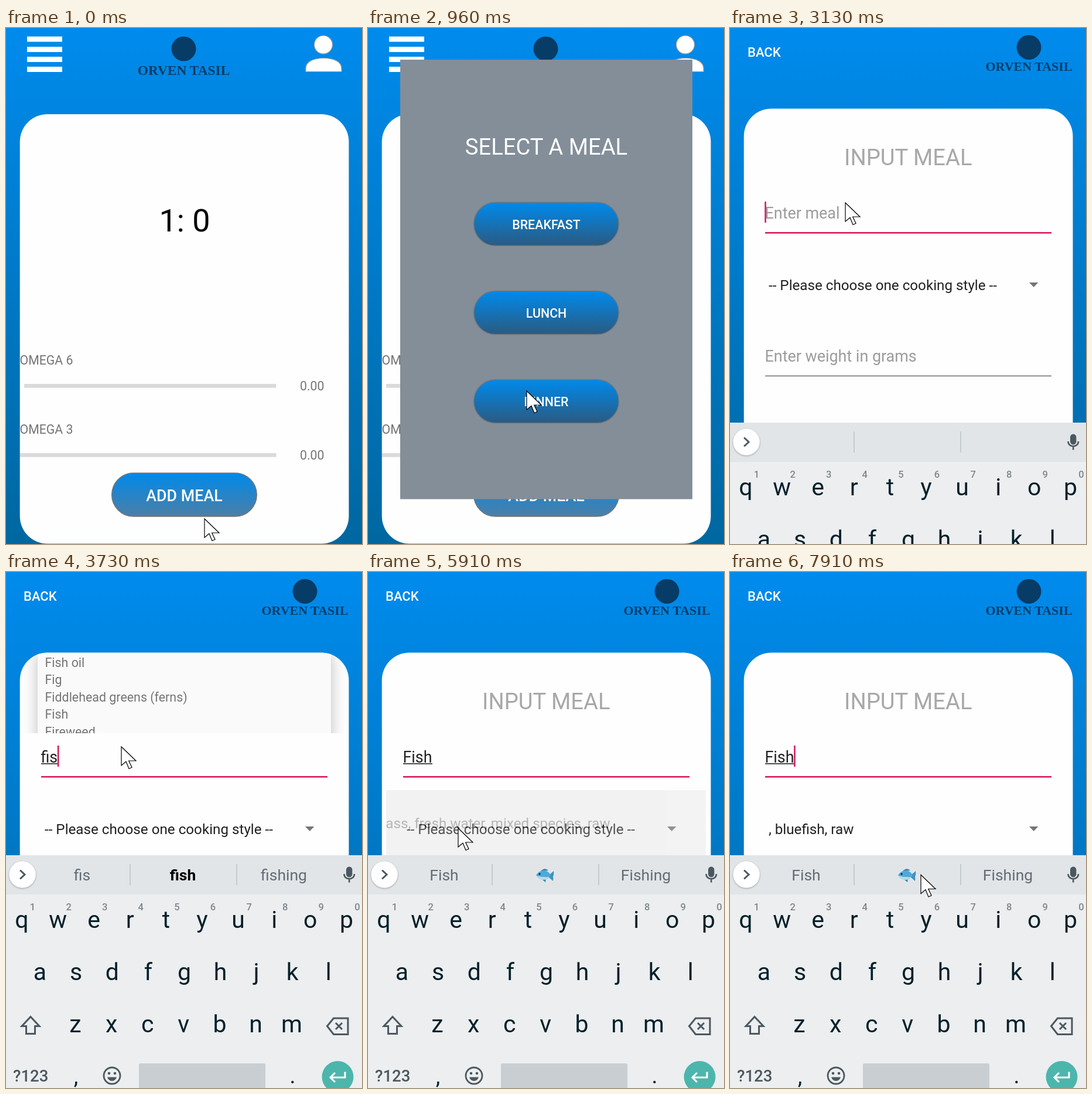
Write an HTML page that moves like this. It is 608 px wide and 880 px high and loops after 8000 ms.

```html
<!DOCTYPE html>
<html lang="en">
<head>
<meta charset="utf-8">
<title>Meal input</title>
<style>
html, body { margin: 0; width: 100%; height: 100%; overflow: hidden; }
svg { display: block; width: 608px; height: 880px; font-family: Roboto, "Noto Sans", sans-serif; }
text { white-space: pre; }
.mid { text-anchor: middle; }
.med { font-weight: 500; }
.brand { font-family: "Liberation Serif", "Noto Serif", serif; font-weight: 700; text-anchor: middle; }
</style>
</head>
<body>
<svg id="stage" viewBox="0 0 608 880" xmlns="http://www.w3.org/2000/svg"></svg>
<script>
const LOOP = 8000;
const stage = document.getElementById('stage');

// ---- markup helpers ----
const text = (x, y, size, fill, str, cls = '', id = '') =>
  `<text x="${x}" y="${y}" font-size="${size}" fill="${fill}" class="${cls}" id="${id}">${str}</text>`;
const rect = (x, y, w, h, fill, extra = '') =>
  `<rect x="${x}" y="${y}" width="${w}" height="${h}" fill="${fill}" ${extra}/>`;
const group = (id, body, extra = '') => `<g id="${id}" ${extra}>${body}</g>`;
const line = (d, color, width, extra = '') =>
  `<path d="${d}" fill="none" stroke="${color}" stroke-width="${width}" ${extra}/>`;
const grad = (id, a, b) =>
  `<linearGradient id="${id}" x2="0" y2="1"><stop stop-color="${a}"/><stop offset="1" stop-color="${b}"/></linearGradient>`;
const clip = (id, body) => `<clipPath id="${id}">${body}</clipPath>`;

const button = (y, label, size, base, fill) =>
  rect(180.7, y, 247.6, 74, `url(#${fill})`, 'rx="37" stroke="#737679" stroke-width="1.5"') +
  text(304.5, base, size, '#fff', label, 'mid med');

const logo = (x, y, size, base) =>
  `<circle cx="${x}" cy="${y}" r="21" fill="#063c66"/>` +
  text(x, base, size, '#063c66', 'ORVEN TASIL', 'brand');

const card = y => rect(23.7, y, 561.8, 879.6 - y, '#fefefe', 'rx="47"');

// ---- home ----
const nutrient = (label, y, x) =>
  text(23.5, y, 21.3, '#757575', label) +
  rect(x, y + 33, 461.5 - x, 6.6, '#dadadb') +
  text(502, y + 44, 21.3, '#757575', '0.00');

const home =
  [14.5, 32, 49, 66].map(y => rect(36, y, 60, 9, '#fff')).join('') +
  logo(303.5, 35.5, 23.4, 80) +
  `<g fill="#fff" stroke="#a3a3a3" stroke-width="1.2"><circle cx="542" cy="28.5" r="15.5"/>
   <path d="M512 74.3V69C512 58 524 51.5 542.5 51.5S573 58 573 69V74.3Z"/></g>` +
  card(147) +
  text(305, 347, 54, '#000', '1: 0', 'mid') +
  nutrient('OMEGA 6', 574, 31) + nutrient('OMEGA 3', 692, 24) +
  group('add', button(759, 'ADD MEAL', 26.8, 807, 'btn'));

const modal =
  rect(55, 54, 499, 749.5, '#838e99') +
  text(304.5, 216, 38.2, '#fff', 'SELECT A MEAL', 'mid') +
  ['BREAKFAST', 'LUNCH', 'DINNER'].map((s, i) =>
    button(297.3 + 151.2 * i, s, 21.4, 343 + 151 * i, 'btnDark')).join('');

// ---- meal form ----
const form =
  text(30, 48.7, 22, '#fff', 'BACK', 'med') +
  logo(510.5, 33, 22, 73) +
  card(137.5) +
  text(304.3, 233.5, 38.2, '#a8a8a8', 'INPUT MEAL', 'mid') +
  text(59.5, 325, 26.9, '#9c9c9c', 'Enter meal', '', 'hint') +
  text(59.5, 324.5, 26.8, '#212121', '', '', 'typed') +
  rect(60, 326.2, 0, 1.6, '#212121', 'id="under"') +
  rect(0, 296, 2.6, 36, '#d81b60', 'id="caret"') +
  rect(60, 348, 489, 1.6, '#757575', 'id="field"') +
  text(66, 447, 24.2, '#212121', '', '', 'style') +
  '<path d="M511 434h15.4l-7.7 8Z" fill="#757575"/>' +
  text(59.5, 569, 26.9, '#9c9c9c', 'Enter weight in grams') +
  rect(60, 592.6, 489, 1.6, '#757575') +
  button(743.5, 'INPUT MEAL', 21.4, 788.5, 'btn');

const foods = ['Fish oil', 'Fig', 'Fiddlehead greens (ferns)', 'Fish', 'Fireweed'];
const matches = ['Fish oil', 'Fish'];
const hintList = (id, items, top) => group(id,
  rect(54, top, 501, 290 - top, '#fafafa', 'style="filter:drop-shadow(0 2px 13px rgba(0,0,0,.26))"') +
  items.map((s, i) => text(66.5, top + 24.5 + 29.4 * i, 21.4, '#757575', s)).join(''));

const styles = ['-- Please choose one cooking style --', ', anchovy, european, raw',
  ', anchovy, european, canned with olive oil, drained solids',
  ', bass, fresh water, mixed species, raw', ', bass, striped, raw',
  ', bluefish, raw', ', burbot (loche), native, raw'];
const styleList =
  rect(0, 0, 608, 483, '#eee', 'id="sheet"') +
  group('rows', rect(24, 337.3, 562, 72.8, '#000', 'id="pick" opacity=".12"') +
    styles.map((s, i) => text(6, 19 + 72.8 * i, 24.2, '#000', s)).join(''));

// ---- keyboard ----
const ink = '#4b585f';
const keyRow = (keys, x, y) => [...keys].map((k, i) =>
  text(x + 61.6 * i, y, 41, '#06202a', k, 'mid')).join('');
const fish =
  `<g id="fish"><path d="M309 517l8-7q1 7-1 9 1 4 0 8l-8-7Z" fill="#3d93c4"/>
   <path d="M295 510q7-7 13-1ZM297 524l6 5 1-6Z" fill="#2f83b5"/>
   <path d="M287 517q6-9 15-8 6 1 10 8-5 8-12 8-8 0-13-8Z" fill="#4fa9d8"/>
   <path d="M287.5 518q10 3 22 2-4 5-10 5-7 0-12-7Z" fill="#b5dcec"/>
   <circle cx="293" cy="515" r="1.7" fill="#12303f"/></g>`;

const keyboard =
  rect(0, 483, 608, 397, '#eceef0') + rect(0, 483, 608, 67, '#e2e5e8') +
  rect(0, 483, 608, 51, 'url(#shade)', 'id="shadow"') +
  '<circle cx="28" cy="516" r="22.7" fill="#fff" style="filter:drop-shadow(0 1px 1.5px rgba(0,0,0,.3))"/>' +
  line('M24 508.5l8 7.5-8 7.5', ink, 3) +
  rect(211, 498, 2, 36, '#c5cacd') + rect(393, 498, 2, 36, '#c5cacd') +
  text(130, 526, 26.5, '#626d74', '', 'mid', 'word0') +
  text(302, 526, 26.5, '#000', 'fish', 'mid', 'word1') +
  text(474.5, 526, 26.5, '#626d74', '', 'mid', 'word2') + fish +
  rect(581, 502.5, 10.4, 18, ink, 'rx="5.2"') +
  line('M577.5 515c0 11 17.5 11 17.5 0M586.2 523v6.5', ink, 2.6) +
  keyRow('qwertyuiop', 27, 607) + keyRow('asdfghjkl', 58, 696) + keyRow('zxcvbnm', 118.5, 785) +
  [...'1234567890'].map((n, i) => text(45.5 + 61.6 * i, 577, 16.5, '#7d888e', n, 'mid med')).join('') +
  line('M42 758.5L57 774.5H49.5V787.5H34.5V774.5H27Z', ink, 3) +
  line('M548.5 774.5L559.5 761H584V788.5H559.5ZM563 769l11 11m0-11l-11 11', ink, 3) +
  text(12, 869, 27.5, ink, '?123', 'med') +
  text(119.5, 873, 38, '#06202a', ',', 'mid') + text(489.5, 872, 38, '#06202a', '.', 'mid') +
  `<circle cx="181" cy="859" r="14" fill="none" stroke="${ink}" stroke-width="2.8"/>
   <g fill="${ink}"><circle cx="176" cy="855" r="2.3"/><circle cx="186" cy="855" r="2.3"/>
   <path d="M173 861.5h16q-2 6.5-8 6.5t-8-6.5Z"/></g>` +
  rect(227, 838, 216, 50, '#c9ced2', 'rx="3"') +
  '<circle cx="566.5" cy="861" r="27" fill="#4cb6ac"/>' +
  line('M579 852.5v9.5H554m8-8l-8 8 8 8', '#fff', 3);

stage.innerHTML =
  '<defs>' + grad('sky', '#008bed', '#0067a0') + grad('btn', '#0089ea', '#4c7fa6') +
  grad('btnDark', '#008aec', '#2b5a80') +
  `<linearGradient id="shade" x2="0" y2="1"><stop stop-opacity=".13"/><stop offset="1" stop-opacity="0"/></linearGradient>` +
  clip('hintClip', '<path d="M24 275V184.500A47 47 0 0 1 71 137.500H538.500A47 47 0 0 1 585.500 184.500V275Z"/>') +
  clip('reveal', rect(0, 0, 608, 483, '#000', 'id="window"')) + '</defs>' +
  rect(0, 0, 608, 880, 'url(#sky)') +
  group('home', home) + group('modal', modal) +
  group('form', form) +
  `<g clip-path="url(#hintClip)">${hintList('wide', foods, 137.5)}${hintList('narrow', matches, 213)}</g>` +
  group('popup', styleList, 'clip-path="url(#reveal)"') +
  group('keys', keyboard) +
  group('cursor', '<path d="M0 0V32L8 25.2L13 37.5L18 35.3L12.700 24H25Z" fill="#fff" stroke="#000" stroke-width="1.2"/>');

const el = {};
stage.querySelectorAll('[id]').forEach(n => n.id && (el[n.id] = n));

// ---- timeline: each row holds from its time until the next ----
const pointer = [
  [0, 339, 837], [60, 312, 803], [180, 281, 765], [800, 276, 700], [960, 271, 619],
  [1120, 274, 560], [1270, 283, 497], [1430, 290, 460], [1580, 313, 469], [2040, 314, 484],
  [2200, 296, 450], [2350, 252, 380], [2510, 212, 318], [2660, 197, 298],
  [4350, 19, 445], [4830, 40, 420], [5150, 92, 300], [5300, 98, 240], [5600, 120, 320],
  [5760, 152, 425], [5910, 154, 437], [6050, 150, 450], [6210, 140, 463], [6370, 125, 440],
  [6520, 114, 405], [6670, 112, 392], [7290, 135, 410], [7440, 190, 445],
  [7600, 255, 485], [7750, 305, 507], [7910, 326, 516.5]];
const typing = [[0, ''], [3430, 'f'], [3580, 'fi'], [3730, 'fis'], [3880, 'fish'], [5450, 'Fish']];
const blink = [[0, 0], [2820, 1], [4680, 0], [5150, 1], [5760, 0], [6210, 1], [7290, 0], [7750, 1]];
const modalFade = [[0, 0, 1], [650, 0.6, 0.96], [800, 1, 1], [2040, 0, 1]];
const keysDrop = [[0, 397], [3130, 190], [3280, 0]];
const hints = [[0, ''], [3580, 'wide'], [3880, 'narrow'], [5450, '']];
// time, opacity, row shift, window top, side inset, sheet colour
const sheet = [
  [0, 0, 0, 0, 0, '#eee'], [5910, 0.28, 200, 372, 31, '#d4d4d4'], [6050, 0.8, 36, 66, 6, '#eaeaea'],
  [6210, 1, 0, 0, 0, '#eee'], [6830, 0.82, 0, 0, 0, '#eee'], [6980, 0.35, 0, 0, 0, '#eee'],
  [7140, 0, 0, 0, 0, '#eee']];
const words = { '': ['', '', ''], f: ['f', '', ''], fi: ['fi', '', ''], fis: ['fis', 'fish', 'fishing'],
  fish: ['fish', '', 'fishing'], Fish: ['Fish', '', 'Fishing'] };

const at = (rows, t) => rows.findLast(r => r[0] <= t).slice(1);
const set = (n, attrs) => { for (const k in attrs) n.setAttribute(k, attrs[k]); };
const show = (n, on) => { n.style.display = on ? '' : 'none'; };
const zoom = (x, y, s) => `translate(${x} ${y}) scale(${s}) translate(${-x} ${-y})`;

function render(t) {
  const onForm = t >= 2040;
  show(el.home, !onForm);
  show(el.form, onForm);
  el.add.style.filter = t >= 490 && t < 960 ? 'drop-shadow(0 8px 9px rgba(0,0,0,.25))' : '';

  const [fade, size] = at(modalFade, t);
  show(el.modal, fade);
  set(el.modal, { opacity: fade, transform: zoom(304.5, 428, size) });
  set(el.form, { transform: zoom(304.5, 450, t < 2200 ? 0.988 : 1) });

  const [str] = at(typing, t);
  el.typed.textContent = str;
  const w = str && onForm ? el.typed.getComputedTextLength() : 0;
  show(el.hint, !str);
  set(el.under, { width: w });
  set(el.caret, { x: 59.2 + w, opacity: at(blink, t)[0] });
  const focus = t >= 2820;
  set(el.field, { height: focus ? 2.6 : 1.6, fill: focus ? '#d81b60' : '#757575' });
  el.style.textContent = styles[t >= 6670 ? 5 : 0];

  const [list] = at(hints, t);
  show(el.wide, list === 'wide');
  show(el.narrow, list === 'narrow');

  const [alpha, shift, top, side, color] = at(sheet, t);
  show(el.popup, alpha);
  set(el.popup, { opacity: alpha });
  set(el.sheet, { fill: color });
  set(el.rows, { transform: `translate(0 ${shift})` });
  set(el.window, { x: side, y: top, width: 608 - 2 * side, height: 483 - top });
  show(el.pick, t >= 6670);
  set(el.shadow, { opacity: t >= 6050 ? alpha : 0 });

  const [drop] = at(keysDrop, t);
  set(el.keys, { transform: `translate(0 ${drop})` });
  words[str].forEach((s, i) => { el['word' + i].textContent = s; });
  el.word1.style.fontWeight = 700;
  show(el.fish, str.length === 4);

  const [x, y] = at(pointer, t);
  set(el.cursor, { transform: `translate(${x} ${y})` });
}

const start = performance.now();
function tick() {
  render((performance.now() - start) % LOOP);
  requestAnimationFrame(tick);
}
tick();
</script>
</body>
</html>
```
